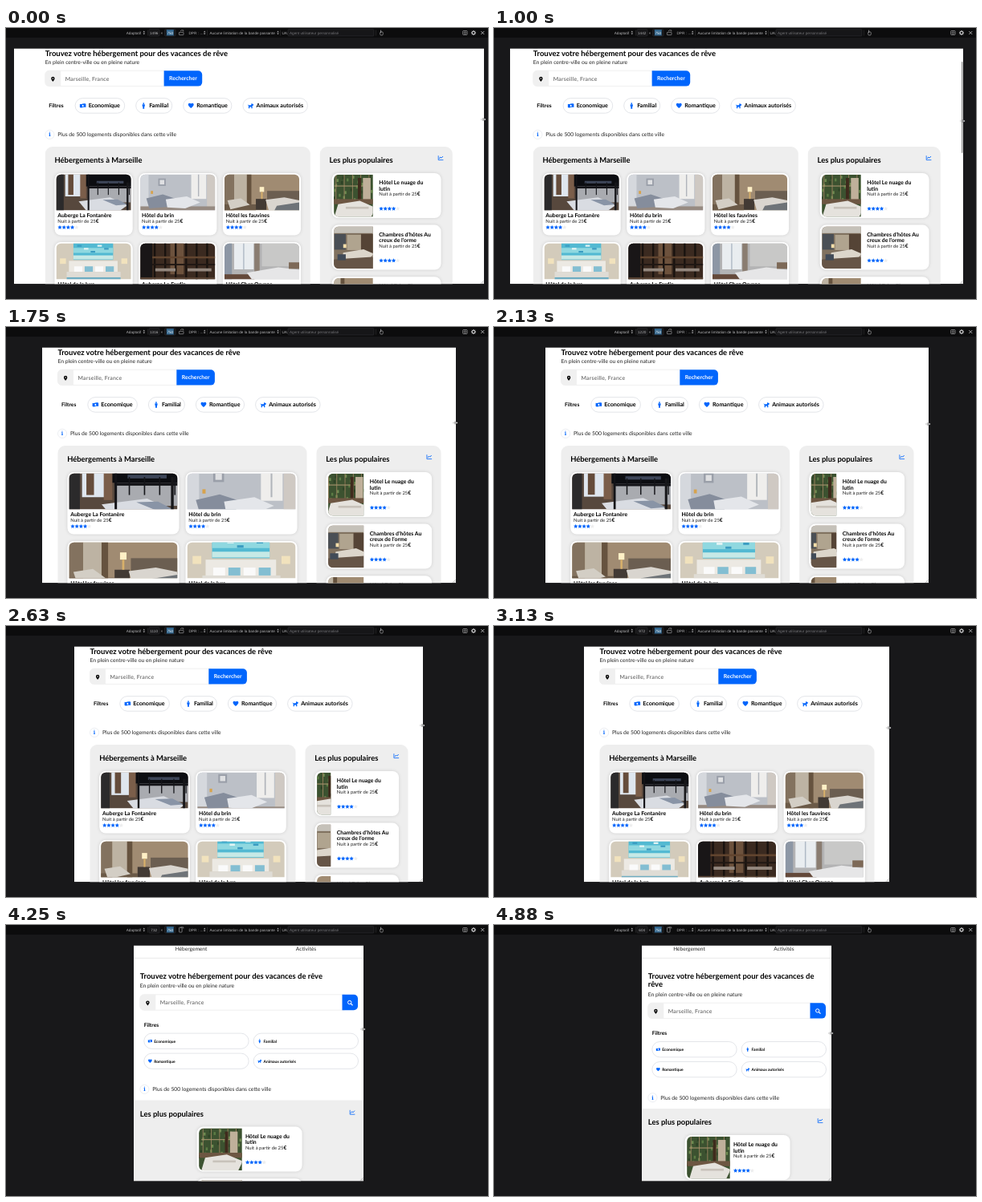
Recreate the animation shown at these times as an HTML page with a canvas. Size 600x338 px, loop 5010 ms.

```html
<!DOCTYPE html>
<html lang="fr">
<head>
<meta charset="utf-8">
<title>Page adaptative</title>
<style>
  html, body { margin: 0; width: 100%; height: 100%; overflow: hidden; background: #18181a; }
  canvas { display: block; width: 600px; height: 338px; }
</style>
</head>
<body>
<canvas id="stage"></canvas>
<script>
const LOOP = 5010, STEP = 125, LAST = 39;
const SCALE = 0.391, MID = 302.3, TOP = 25.4, BOTTOM = 319.3;
const BLUE = '#0065fc', GREY = '#eeeeee', DARK = '#18181a', INK = '#222';

const canvas = document.getElementById('stage');
const ctx = canvas.getContext('2d');
const dpr = window.devicePixelRatio || 1;
canvas.width = 600 * dpr;
canvas.height = 338 * dpr;

// Viewport width and pointer height at a few steps of the drag
const widthKeys = [[0, 1496], [5, 1496], [6, 1488], [8, 1442], [10, 1396], [11, 1386], [15, 1293],
  [17, 1220], [20, 1145], [25, 972], [30, 838], [35, 705], [39, 604]];
const pointerKeys = [[0, 114], [8, 116], [11, 118], [17, 121], [25, 127], [30, 126], [39, 135]];

function at(keys, k) {
  const i = Math.max(1, keys.findIndex(p => p[0] >= k));
  const [a, va] = keys[i - 1], [b, vb] = keys[i];
  return va + (vb - va) * (k - a) / (b - a);
}

// ---------- basic drawing ----------
function rect(color, x, y, w, h) {
  ctx.fillStyle = color;
  ctx.fillRect(x, y, w, h);
}

function box(x, y, w, h, radius, fill, stroke) {
  ctx.beginPath();
  ctx.roundRect(x, y, w, h, radius);
  if (fill) { ctx.fillStyle = fill; ctx.fill(); }
  if (stroke) { ctx.strokeStyle = stroke; ctx.lineWidth = 0.6; ctx.stroke(); }
}

function ring(color, width, x, y, r) {
  ctx.strokeStyle = color;
  ctx.lineWidth = width;
  ctx.beginPath();
  ctx.arc(x, y, r, 0, 7);
  ctx.stroke();
}

function line(color, width, ...pts) {
  ctx.strokeStyle = color;
  ctx.lineWidth = width;
  ctx.beginPath();
  for (let i = 0; i < pts.length; i += 2) ctx.lineTo(pts[i], pts[i + 1]);
  ctx.stroke();
}

function shape(color, ...pts) {
  ctx.fillStyle = color;
  ctx.beginPath();
  for (let i = 0; i < pts.length; i += 2) ctx.lineTo(pts[i], pts[i + 1]);
  ctx.fill();
}

function text(str, x, y, size, { weight = 400, color = INK, align = 'left', space = 0, font = 'Lato' } = {}) {
  ctx.font = `${weight} ${size}px ${font}, sans-serif`;
  ctx.letterSpacing = space + 'px';
  ctx.textAlign = align;
  ctx.fillStyle = color;
  ctx.fillText(str, x, y);
  return ctx.measureText(str).width;
}
const bold = (str, x, y, size, opt) => text(str, x, y, size, { weight: 700, color: '#000', ...opt });

const icons = {
  pin: 'M12 1a8 8 0 0 0-8 8c0 6 8 14 8 14s8-8 8-14a8 8 0 0 0-8-8zM12 6a3 3 0 1 0 0 6a3 3 0 0 0 0-6z',
  money: 'M0 5c8 4 16-4 24 0v14c-8-4-16 4-24 0zM12 8a3 4 0 1 0 0 8a3 4 0 0 0 0-8z',
  person: 'M12 0a3 3 0 1 1 0 6a3 3 0 0 1 0-6zM7 7h10v8h-2v9H9v-9H7z',
  heart: 'M12 22C5 16 1 12 1 7.500a6 6 0 0 1 11-3a6 6 0 0 1 11 3c0 4.500-4 8.500-11 14.500z',
  dog: 'M0 6l4 4h10l2-8 3 3h3l2 4-3 3h-2v11h-4v-6H8v6H4v-9z',
  star: 'M12 1l3.400 7.100 7.600 1-5.600 5.300 1.400 7.600L12 18.300 5.200 22l1.400-7.600L1 9.100l7.600-1z'
};
for (const name in icons) icons[name] = new Path2D(icons[name]);

function icon(name, cx, cy, size, color = BLUE) {
  ctx.save();
  ctx.translate(cx - size / 2, cy - size / 2);
  ctx.scale(size / 24, size / 24);
  ctx.fillStyle = color;
  ctx.fill(icons[name], 'evenodd');
  ctx.restore();
}

function stars(x, y) {
  for (let i = 0; i < 5; i++) icon('star', x + 2.7 + i * 5.2, y, 5.7, i < 4 ? BLUE : '#eeeeee');
}

// ---------- room pictures, in a unit square ----------
function bunkRoom() {
  rect('#57483d', 0, 0, 1, 1);
  rect('#2b2a2b', 0, 0, .1, 1);
  rect('#dfe6ee', .12, 0, .27, .58);
  rect('#654c3b', .16, 0, .07, .55);
  rect('#7b5e4a', .32, 0, .08, .62);
  rect('#a9abb0', .43, .3, .57, .4);
  rect('#0c0d11', .4, 0, .6, .38);
  rect('#3d4558', .54, .27, .36, .05);
  shape('#d9dce2', .3, .68, .72, .6, .95, .76, .8, .92, .4, .86);
  shape('#8994a6', .62, .65, .82, .64, .95, .74, .8, .76);
  rect('#131317', .42, .12, .022, .75);
  rect('#131317', .42, .38, .58, .04);
  for (let x = .55; x < 1; x += .14) rect('#15161a', x, .3, .012, .25);
  rect('#17171a', .94, .3, .025, .6);
}

function paleRoom() {
  rect('#bcc0c7', 0, 0, 1, 1);
  rect('#d5d8dd', 0, 0, .11, 1);
  rect('#9a9fa9', .24, .22, .1, .15);
  rect('#dfe0e2', .26, .25, .06, .09);
  rect('#efeeec', .68, .08, .2, .55);
  rect('#b0b4ba', .77, .08, .015, .5);
  rect('#cfc9c3', .89, 0, .11, .8);
  rect('#978b82', 0, .78, 1, .22);
  shape('#858d9c', .08, .62, .3, .54, .46, .62, .45, .78, .12, .82);
  shape('#e4e6ea', .34, .64, .62, .58, .8, .7, .6, .82, .36, .8);
  rect('#d7a34d', .14, .47, .03, .06);
}

function lampRoom() {
  rect('#a08b72', 0, 0, 1, 1);
  rect('#83725f', 0, 0, .13, 1);
  rect('#bdb3a3', .13, 0, .17, .8);
  rect('#66533f', .3, 0, .06, .85);
  rect('#6b5a48', 0, .74, .42, .26);
  shape('#d3cec5', .04, .66, .22, .62, .34, .75, .08, .84);
  rect('#6b5e51', .57, .47, .43, .22);
  rect('#423a34', .42, .63, .14, .22);
  rect('#fff0c6', .47, .39, .06, .1);
  rect('#d8b06a', .49, .49, .02, .14);
  shape('#d9d5cf', .55, .65, .8, .6, 1, .66, 1, .9, .6, .9);
  shape('#6e7378', .7, .77, 1, .7, 1, 1, .62, 1);
}

function seaRoom() {
  rect('#d3cbbb', 0, 0, 1, 1);
  rect('#52b9d2', .23, 0, .53, .47);
  rect('#8fd8e0', .23, .23, .53, .1);
  rect('#c6e9e6', .23, .38, .53, .08);
  for (let i = 0; i < 5; i++) rect(i % 2 ? '#e2f4f4' : '#3a9cc2', .28 + i * .09, .17 + i % 3 * .06, .06, .035);
  rect('#ece9e3', .17, .49, .65, .22);
  rect('#f1e2bd', .05, .44, .08, .11);
  rect('#f1e2bd', .87, .44, .08, .11);
  for (let i = 0; i < 4; i++) rect(i % 2 ? '#83bed2' : '#fafafa', .24 + i * .14, .6, .11, .11);
  rect('#dfdcd5', .14, .71, .72, .29);
  rect('#6eacc1', .14, .82, .72, .1);
}

function woodRoom() {
  rect('#3b2a20', 0, 0, 1, 1);
  rect('#191617', 0, 0, .16, 1);
  rect('#6d523d', .4, .1, .18, .66);
  for (let i = 0; i < 6; i++) rect('#18120f', .18 + i * .14, 0, .025, 1);
  rect('#62452f', .16, .4, .84, .04);
  rect('#1f1713', .16, .55, .84, .03);
  rect('#93877e', .2, .64, .27, .06);
  rect('#93877e', .63, .64, .32, .06);
  rect('#554031', 0, .82, 1, .18);
}

function brightRoom() {
  rect('#b3b3b4', 0, 0, 1, 1);
  rect('#8d97a5', 0, 0, .1, 1);
  rect('#e9edf0', .13, 0, .26, .66);
  rect('#aeb9c5', .25, 0, .015, .66);
  rect('#8a7d71', .4, 0, .07, .78);
  rect('#c8c8c7', .5, 0, .5, .6);
  rect('#64493a', 0, .76, .4, .24);
  shape('#e6e6e7', .3, .73, .72, .62, 1, .67, 1, .93, .4, .93);
  rect('#7d6957', .86, .52, .14, .13);
}

function gardenRoom() {
  rect('#3c5230', 0, 0, 1, 1);
  for (let i = 0; i < 45; i++) {
    const x = i * .618 % 1, y = i * .377 % .65;
    rect(['#5c7d45', '#2e4226', '#6f8c51'][i % 3], x, y, .03, .07);
  }
  for (let i = 0; i < 5; i++) rect('#97805d', .22 + i * .13, 0, .012, .6);
  rect('#a8946f', .2, .26, .55, .02);
  rect('#3f2b1d', .57, .08, .05, .54);
  rect('#bfb09a', .65, .08, .12, .55);
  rect('#6d5642', .1, .58, .8, .12);
  shape('#e5e2dd', .26, .7, .6, .62, .85, .78, .78, 1, .2, 1);
  rect('#c8c2ba', .38, .76, .36, .05);
}

function suiteRoom() {
  rect('#80715f', 0, 0, 1, 1);
  rect('#c5c1b9', .15, 0, .7, .16);
  rect('#4a4f55', .2, .18, .18, .37);
  rect('#b0a48f', .4, .2, .22, .36);
  rect('#554436', .62, .18, .2, .45);
  rect('#f3dda9', .34, .42, .05, .09);
  shape('#dcd6cb', .34, .62, .66, .54, .82, .65, .72, .82, .32, .78);
  shape('#665547', .2, .78, .8, .72, 1, 1, 0, 1);
  rect('#414b58', .25, .66, .13, .14);
}

// Cover-fit a 3:2 picture into a rounded window
function photo(draw, x, y, w, h, radius) {
  const pw = Math.max(w, h * 1.5), ph = pw / 1.5;
  ctx.save();
  ctx.beginPath();
  ctx.roundRect(x, y, w, h, radius);
  ctx.clip();
  ctx.translate(x + (w - pw) / 2, y + (h - ph) / 2);
  ctx.scale(pw, ph);
  draw();
  ctx.restore();
}

const hotels = [
  ['Auberge La Fontanère', bunkRoom], ['Hôtel du brin', paleRoom], ['Hôtel les fauvines', lampRoom],
  ['Hôtel de la lyre', seaRoom], ['Auberge Le Fardin', woodRoom], ['Hôtel Chez Orvane', brightRoom]
];
const favourites = [
  ['Hôtel Le nuage du', 'lutin', gardenRoom],
  ['Chambres d’hôtes Au', 'creux de l’orme', suiteRoom],
  ['Hôtel Brise Plume', '', lampRoom]
];
// label, icon, normal width, small width
const filters = [
  ['Economique', 'money', 61.6, 47], ['Familial', 'person', 45, 34],
  ['Romantique', 'heart', 60.2, 46], ['Animaux autorisés', 'dog', 80.5, 63]
];

// ---------- page parts ----------
function card(x, y, w, h) {
  ctx.save();
  ctx.shadowColor = 'rgba(0,0,0,.13)';
  ctx.shadowBlur = 4 * dpr;
  box(x, y, w, h, 8, '#fff');
  ctx.restore();
}

function price(x, y) {
  const w = text('Nuit à partir de 25', x, y, 5.9);
  bold('€', x + w, y, 6.6);
}

function hotelGrid(x, y, w) {
  box(x, y, w, 220, 9, GREY);
  bold('Hébergements à Marseille', x + 11.7, y + 19.6, 9.4);
  const inner = w - 23.4, gap = 7.5, cols = inner >= 306 ? 3 : 2;
  const cw = Math.min(139, (inner - gap * (cols - 1)) / cols);
  const spare = (inner - cw * cols - gap * (cols - 1)) / cols;
  hotels.slice(0, cols * 2).forEach(([name, draw], i) => {
    const cx = x + 11.7 + spare / 2 + (i % cols) * (cw + gap + spare);
    const cy = y + 33 + Math.floor(i / cols) * 86;
    card(cx, cy, cw, 77.5);
    photo(draw, cx + 2, cy + 1.8, cw - 4, 44.5, [6, 6, 0, 0]);
    bold(name, cx + 3.8, cy + 55.4, 6.85);
    price(cx + 3.8, cy + 62.2);
    stars(cx + 3.8, cy + 67.5);
  });
}

function chartIcon(x, y) {
  line(BLUE, 0.8, x - 3, y - 2.8, x - 3, y + 2.6, x + 3.2, y + 2.6);
  line(BLUE, 0.9, x - 2, y + 1, x - .4, y - 1, x + .8, y + .2, x + 2.8, y - 2);
}

function favouriteCard([first, second, draw], x, y, w, imgW, textX) {
  card(x, y, w, 56);
  photo(draw, x + 2.6, y + 1.8, imgW, 52.8, [6, 0, 0, 6]);
  bold(first, textX, y + 14.2, 6.85);
  bold(second, textX, y + 21.5, 6.85);
  price(textX, y + 28.4);
  stars(textX, y + 44.3);
}

function favouriteList(x, y, w) {
  box(x, y, w, 260, 9, GREY);
  bold('Les plus populaires', x + 11.7, y + 19.6, 9.45);
  chartIcon(x + w - 14.6, y + 14);
  const cw = Math.min(136, w - 23.4), cx = x + (w - cw) / 2;
  favourites.forEach((f, i) => favouriteCard(f, cx + .3, y + 33 + i * 64.6, cw, cw - 87.5, cx + cw - 77));
}

function searchBar(x, y, inputW, compact) {
  const bx = x + 19.5 + inputW, bw = compact ? 19.5 : 47.6;
  box(x, y, bx - x + 3, 19.4, [5, 0, 0, 5], '#fff', '#e4e4e4');
  box(x, y, 19.5, 19.4, [5, 0, 0, 5], '#f0f0f0');
  icon('pin', x + 9.6, y + 10.6, 6.6, '#000');
  text('Marseille, France', x + 25, y + 12.3, 6.9, { weight: 500, color: '#606060', space: 0.22 });
  box(bx, y, bw, 19.4, [0, 5, 5, 0], BLUE);
  if (!compact) {
    bold('Rechercher', bx + bw / 2, y + 12.2, 6.9, { color: '#fff', align: 'center' });
    return;
  }
  ring('#fff', 1, bx + 9.2, y + 9.7, 2.2);
  line('#fff', 1.2, bx + 10.8, y + 11.3, bx + 13, y + 13.4);
}

function pill([label, name], x, y, w, h, size, pad) {
  const iconSize = size * 1.05;
  box(x, y, w, h, h / 2, '#fff', '#d0d4da');
  icon(name, x + pad + iconSize / 2, y + h / 2, iconSize);
  bold(label, x + pad + size * 1.5, y + h / 2 + size * .36, size);
}

function info(x, y) {
  ring('#dfe3ea', .6, x + 5.6, y, 5.6);
  bold('i', x + 5.6, y + 2.5, 7, { color: BLUE, align: 'center', font: '"Noto Serif"' });
  text('Plus de 500 logements disponibles dans cette ville', x + 15.5, y + 2.5, 6.75);
}

const TITLE = 'Trouvez votre hébergement pour des vacances de';
const SUBTITLE = 'En plein centre-ville ou en pleine nature';

function desktopPage(vw, pw, left) {
  const w = Math.min(507, pw - 38), x = w < 507 ? left + 19.5 : MID - w / 2, small = vw < 900;
  bold(TITLE + ' rêve', x, 35.3, 9.45);
  text(SUBTITLE, x, 44.5, 6.75);
  searchBar(x, 53.2, 128.3, false);

  bold('Filtres', x + 4.5, small ? 97.6 : 99.4, 6.6);
  let px = x + (small ? 42 : 37.3);
  for (const f of filters) {
    const fw = small ? f[3] : f[2];
    if (small) pill(f, px, 88, fw, 14, 5.5, 4);
    else pill(f, px, 87.6, fw, 18.6, 7.15, 5.8);
    px += fw + (small ? 18 : 14);
  }

  const dy = small ? -4 : 0;
  info(x, 132.9 + dy);
  if (vw >= 1024) {
    const side = (w - 12) / 3;
    hotelGrid(x, 148 + dy, side * 2);
    favouriteList(x + side * 2 + 12, 148 + dy, side);
  } else hotelGrid(x, 148 + dy, w);
}

function mobilePage(pw, left) {
  const x = left + 7.8, right = left + pw;
  text('Hébergement', left + pw / 4, 32.2, 6.6, { align: 'center' });
  text('Activités', left + pw * .75, 32.2, 6.6, { align: 'center' });
  line('#e2e2e2', 0.8, left, 41.3, right, 41.3);

  const wraps = pw - 15.6 < 226, dy = wraps ? 0 : -10.4;
  bold(TITLE + (wraps ? '' : ' rêve'), x, 66.6, 9.45);
  if (wraps) bold('rêve', x, 77, 9.45);
  text(SUBTITLE, x, 88.5 + dy, 6.75);
  searchBar(x, 97.2 + dy, right - 7 - x - 39, true);

  bold('Filtres', x + 5, 137.3 + dy, 6.6);
  const fw = (right - 6.5 - x - 11) / 2;
  filters.forEach((f, i) =>
    pill(f, x + 5 + (i % 2) * (fw + 6), 145.5 + dy + (i >> 1) * 25, fw, 19.3, 4.9, 5));
  info(x, 215.3 + dy);

  rect(GREY, left, 229 + dy, pw, 120);
  bold('Les plus populaires', x, 249 + dy, 9.45);
  chartIcon(right - 13.8, 244 + dy);
  const cx = MID + .8 - 65.5;
  favourites.forEach((f, i) => favouriteCard(f, cx, 262 + dy + i * 64.6, 131, 53.5, cx + 60.3));
}

// ---------- device toolbar ----------
function toolbar(vw) {
  const light = '#b4b4b6', edge = '#303033';
  const tool = (s, x, opt) => text(s, x, 7.6, 4.68, { color: light, font: '"Liberation Sans"', ...opt });
  const arrows = x => {
    shape(light, x - 1.2, 5.3, x, 3.5, x + 1.2, 5.3);
    shape(light, x - 1.2, 6.5, x, 8.3, x + 1.2, 6.5);
  };
  rect('#0c0c0d', 0, 0, 600, 12);
  for (const x of [176, 250.5, 341.5, 460.5]) rect('#39393b', x, 2.5, .5, 7);
  tool('Adaptatif', 149.7);
  arrows(171.8);
  box(178, 1.7, 13, 8.3, 1, '#161618', edge);
  tool(String(Math.round(vw)), 184.2, { align: 'center' });
  tool('×', 193.9, { align: 'center' });
  box(197.5, 1.7, 13.5, 8.3, 1, '#161618', edge);
  rect('#31658c', 199.8, 2, 9, 7.5);
  tool('750', 204.3, { align: 'center', color: '#fff' });

  if (vw < 750) box(215.5, 3, 3.6, 6, .6, null, light);
  else box(215.4, 5.3, 5.6, 3.4, .6, null, light);
  line(light, .6, 217, 4, 218.2, 2.8, 220.8, 2.8, 220.8, 4.4);
  tool('DPR : …', 227.5);
  arrows(247.2);
  tool('Aucune limitation de la bande passante', 253.5);
  arrows(338.5);
  tool('UA:', 343.5);
  box(351, 1.7, 107, 8.3, 1, '#161618', edge);
  tool('Agent utilisateur personnalisé', 353, { color: '#757578' });

  box(465.7, 4.8, 3.6, 4.2, 1.2, null, light);
  line(light, .8, 466.6, 6, 466.6, 2.6);
  box(568.7, 3.5, 5.4, 5, .8, null, '#c4c4c6');
  ring('#c4c4c6', .6, 571.4, 6.1, 1.2);
  ring('#c4c4c6', 1.2, 582, 6, 1.9);
  for (let i = 0; i < 8; i++) {
    const c = Math.cos(i * Math.PI / 4), s = Math.sin(i * Math.PI / 4);
    line('#c4c4c6', .8, 582 + c * 2, 6 + s * 2, 582 + c * 3.1, 6 + s * 3.1);
  }
  line('#c4c4c6', .8, 591.3, 4, 595.3, 8);
  line('#c4c4c6', .8, 595.3, 4, 591.3, 8);
}

function pointer(x, y) {
  line('#c8c8c8', .8, x - 2.5, y, x + 2.5, y);
  shape('#d8d8d8', x - 3.4, y, x - 1.6, y - 1.5, x - 1.6, y + 1.5);
  shape('#d8d8d8', x + 3.4, y, x + 1.6, y - 1.5, x + 1.6, y + 1.5);
  line('#555', .7, x, y - 2, x, y + 2);
}

function draw(k) {
  const vw = at(widthKeys, k);
  const left = Math.round(MID - vw * SCALE / 2), right = Math.round(MID + vw * SCALE / 2);
  const pw = right - left;
  ctx.setTransform(dpr, 0, 0, dpr, 0, 0);
  ctx.textRendering = 'geometricPrecision';
  rect(DARK, 0, 0, 600, 338);
  toolbar(vw);

  ctx.save();
  ctx.beginPath();
  ctx.rect(left, TOP, pw, BOTTOM - TOP);
  ctx.clip();
  rect('#fff', left, TOP, pw, BOTTOM - TOP);
  if (vw < 768) mobilePage(pw, left);
  else desktopPage(vw, pw, left);
  if (k > 6 && k < 13) box(right - 2, 42, 1.4, k < 10 ? 114 : 100, .7, '#8f8f8f');
  ctx.restore();

  line('#8a8a8a', .6, right - 4, BOTTOM - .5, right - .5, BOTTOM - 4);
  line('#8a8a8a', .6, right - 2, BOTTOM - .5, right - .5, BOTTOM - 2);
  pointer(right - 1, at(pointerKeys, k));
}

const start = performance.now();
let shown = -1;
function tick() {
  const t = Math.floor((performance.now() - start) % LOOP / 10) * 10;
  const k = Math.min(LAST, Math.floor(t / STEP));
  if (k !== shown) draw(shown = k);
  requestAnimationFrame(tick);
}
tick();
</script>
</body>
</html>
```
